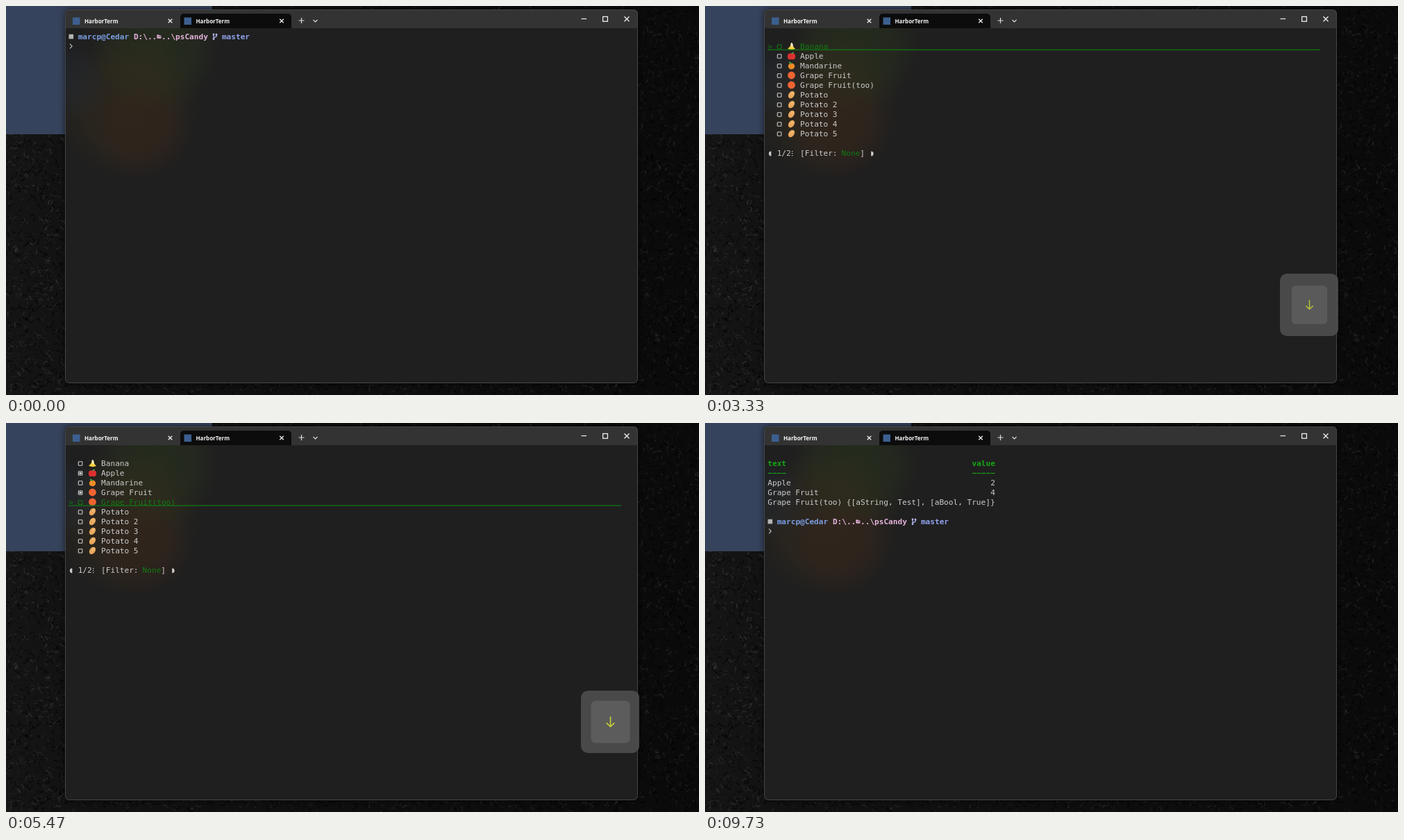
Animation of 998x561 px, one loop 9790 ms. Source, as an HTML page with a canvas:

```html
<!DOCTYPE html>
<html lang="en">
<head>
<meta charset="utf-8">
<title>Terminal list picker</title>
<style>
html, body { margin: 0; width: 100%; height: 100%; overflow: hidden; background: #0a0a0a; }
canvas { display: block; width: 998px; height: 561px; }
</style>
</head>
<body>
<canvas id="stage" width="998" height="561"></canvas>
<script>
const W = 998, H = 561, LOOP = 9790;
const MONO = '"DejaVu Sans Mono", monospace';
const CELL = 6.686, LEFT = 90.3, ROW = 14;
const WHITE = '#cccccc', GREEN = '#16a816', PICK = '#117a12';
const ITEMS = ['Banana', 'Apple', 'Mandarine', 'Grape Fruit', 'Grape Fruit(too)',
  'Potato', 'Potato 2', 'Potato 3', 'Potato 4', 'Potato 5'];
const PRESSES = [[1200, 'up'], [2330, 'enter'], [3330, 'down'], [3600, 'tab'],
  [3870, 'down'], [4070, 'down'], [4330, 'down'], [4530, 'up'], [4730, 'tab'],
  [5400, 'down'], [5930, 'tab'], [6730, 'enter']];
const RECALL = 1330, LIST = 2530, RESULT = 6870, HIDE = 7800, LAG = 70;

const ctx = document.getElementById('stage').getContext('2d');
const backdrop = document.createElement('canvas');
backdrop.width = W;
backdrop.height = H;

const colX = c => LEFT + c * CELL;
const rowY = r => 44 + r * ROW;

function box(g, x, y, w, h, r, fill) {
  g.beginPath();
  g.roundRect(x, y, w, h, r);
  g.fillStyle = fill;
  g.fill();
}

function line(g, color, width, ...paths) {
  g.strokeStyle = color;
  g.lineWidth = width;
  g.beginPath();
  for (const p of paths)
    for (let i = 0; i < p.length; i += 2)
      i ? g.lineTo(p[i], p[i + 1]) : g.moveTo(p[i], p[i + 1]);
  g.stroke();
}

function oval(x, y, rx, ry, turn, fill) {
  ctx.beginPath();
  ctx.ellipse(x, y, rx, ry, turn, 0, 7);
  ctx.fillStyle = fill;
  ctx.fill();
}

function write(str, col, row, color = WHITE, weight = '') {
  ctx.font = `${weight} 11.1px ${MONO}`;
  ctx.fillStyle = color;
  ctx.fillText(str, colX(col), rowY(row) + 4);
}

function randomizer(seed) {
  return () => (seed = (seed * 16807) % 2147483647) / 2147483647;
}

function drawLeather(g) {
  const rnd = randomizer(77);
  const base = g.createLinearGradient(0, 0, W, 0);
  base.addColorStop(0, '#151515');
  base.addColorStop(0.12, '#111111');
  base.addColorStop(0.9, '#0b0b0b');
  base.addColorStop(1, '#0a0a0a');
  g.fillStyle = base;
  g.fillRect(0, 0, W, H);
  g.lineCap = 'round';
  for (let i = 0; i < 16000; i++) {
    const x = rnd() * W, y = rnd() * H, a = rnd() * 6.3, len = 1 + rnd() * 2.5;
    const light = rnd() < 0.5;
    const alpha = rnd() * (x < 100 ? 0.1 : 0.075);
    const width = 0.8 + rnd() * 1.2;
    if (x > 95 && x < 900 && y > 12 && y < 535) continue;
    g.strokeStyle = light ? `rgba(255,255,255,${alpha})` : 'rgba(0,0,0,.45)';
    g.lineWidth = width;
    g.beginPath();
    g.moveTo(x, y);
    g.quadraticCurveTo(x + Math.cos(a) * len, y + Math.sin(a) * len,
      x + Math.cos(a + 0.6) * len * 2, y + Math.sin(a + 0.6) * len * 2);
    g.stroke();
  }
  g.lineCap = 'butt';
}

function glow(g, x, y, r, rgb, alpha) {
  const grad = g.createRadialGradient(x, y, 0, x, y, r);
  grad.addColorStop(0, `rgba(${rgb},${alpha})`);
  grad.addColorStop(0.6, `rgba(${rgb},${alpha * 0.7})`);
  grad.addColorStop(1, `rgba(${rgb},0)`);
  g.fillStyle = grad;
  g.fillRect(85, 32, 825, 512);
}

function cross(g, x, y, r, color, width) {
  line(g, color, width, [x - r, y - r, x + r, y + r], [x - r, y + r, x + r, y - r]);
}

function tab(g, x) {
  box(g, x + 11, 16.5, 10.5, 10.5, 0, '#3c5f8f');
  g.font = '700 8px "Open Sans", "Noto Sans", sans-serif';
  g.fillStyle = '#f4f4f4';
  g.fillText('HarborTerm', x + 28, 25);
  cross(g, x + 151.5, 21.5, 2.8, '#eeeeee', 1.3);
}

function drawBackdrop(g) {
  drawLeather(g);
  g.fillStyle = '#36435c';
  g.fillRect(0, -112, 297, 297);

  g.save();
  g.shadowColor = 'rgba(0,0,0,.6)';
  g.shadowBlur = 10;
  box(g, 85, 5, 825, 539, 6, '#1f1f1f');
  g.restore();
  g.save();
  g.beginPath();
  g.roundRect(85, 5, 825, 539, 6);
  g.clip();
  glow(g, 215, 60, 95, '44,56,28', 0.5);
  glow(g, 175, 145, 105, '58,46,28', 0.5);
  glow(g, 195, 180, 72, '60,34,24', 0.3);
  glow(g, 92, 110, 55, '36,44,56', 0.4);
  g.fillStyle = '#333333';
  g.fillRect(85, 5, 825, 27);
  box(g, 251, 11, 160, 21, [5, 5, 0, 0], '#0c0c0c');
  g.restore();
  g.beginPath();
  g.roundRect(85.5, 5.5, 824, 538, 6);
  g.strokeStyle = '#454545';
  g.lineWidth = 1;
  g.stroke();

  tab(g, 85);
  tab(g, 245.5);
  line(g, '#dddddd', 1.2, [421.5, 21, 429.5, 21], [425.5, 17, 425.5, 25]);
  line(g, '#dddddd', 1.2, [442.5, 20, 445.5, 23, 448.5, 20]);
  line(g, '#eeeeee', 1.2, [828.5, 18.5, 836, 18.5]);
  g.lineWidth = 1.3;
  g.strokeRect(859.6, 15.4, 6.8, 6.8);
  cross(g, 894, 18.7, 3.5, '#eeeeee', 1.3);
}

function caret(col, row) {
  ctx.fillStyle = '#e6e6e6';
  ctx.fillRect(colX(col) + 0.3, rowY(row) - 6.5, 1.2, 13.5);
}

function prompt(row) {
  const y = rowY(row);
  box(ctx, 90.5, y - 3.2, 6.6, 6.6, 0, '#b4b4b4');
  write('marcp@Cedar', 2, row, '#7d9fe4', 'bold');
  write('D:\\..', 14, row, '#e6b2dc', 'bold');
  write('..\\psCandy', 20, row, '#e6b2dc', 'bold');
  write('master', 33, row, '#90a4ee', 'bold');
  box(ctx, 217.5, y - 2.5, 3, 2, 0, '#e6b2dc');
  box(ctx, 217.5, y - 1.5, 6, 4.2, 0.5, '#e6b2dc');
  line(ctx, '#1f1f1f', 0.7, [219, y + 0.2, 224, y + 0.2]);

  const ink = '#b4b4f0';
  line(ctx, ink, 1.3, [299, y - 3, 299, y + 4], [303, y - 2.5, 303, y, 299, y + 2]);
  oval(299, y - 3, 1.4, 1.4, 0, ink);
  oval(303, y - 2.8, 1.4, 1.4, 0, ink);
  oval(299, y + 3.7, 1.4, 1.4, 0, ink);
  line(ctx, '#b8b8b8', 1.2, [92, y + 10.7, 95.2, y + 14, 92, y + 17.3]);
}

function fruit(i, y) {
  const x = 124.5;
  if (i === 0) {
    ctx.beginPath();
    ctx.moveTo(x - 0.5, y - 5);
    ctx.quadraticCurveTo(x + 1.5, y, x + 5.5, y + 4);
    ctx.quadraticCurveTo(x, y + 6.5, x - 5.5, y + 3.5);
    ctx.quadraticCurveTo(x - 1, y + 1, x - 0.5, y - 5);
    ctx.fillStyle = '#f2cf3d';
    ctx.fill();
    oval(x + 0.7, y - 1.8, 1.5, 3.3, -0.15, '#f5ecc4');
  } else if (i === 1) {
    oval(x - 2, y + 0.8, 3.6, 4.5, 0, '#dc3030');
    oval(x + 2, y + 0.8, 3.6, 4.5, 0, '#dc3030');
    oval(x + 1.6, y - 4.2, 2, 1, -0.5, '#4c9c3c');
  } else if (i === 2) {
    oval(x, y + 0.8, 4.7, 4.4, 0, '#f08c28');
    oval(x - 1.6, y - 3.8, 2.4, 1.2, 0.5, '#4c9c3c');
  } else if (i < 5) {
    oval(x, y, 5.4, 5.4, 0, '#f06432');
  } else {
    oval(x, y, 4, 5.8, 0.6, '#e8a65c');
    oval(x + 1, y - 1.5, 1.8, 2.6, 0.6, '#f0b670');
  }
}

function picker(sel, checked) {
  ITEMS.forEach((name, i) => {
    const row = i + 1, y = rowY(row), ink = i === sel ? PICK : WHITE;
    ctx.beginPath();
    ctx.roundRect(104.3, y - 2.3, 5.6, 5.6, 0.8);
    ctx.strokeStyle = ink;
    ctx.lineWidth = 1.1;
    ctx.stroke();
    if (checked.has(i)) box(ctx, 105.5, y - 1.1, 3.2, 3.2, 0, ink);
    fruit(i, y);
    write(name, 7, row, ink);
    if (i === sel) {
      write('>', 0, row, ink);
      line(ctx, PICK, 1.3, [90, y + 5.2, 886, y + 5.2]);
    }
  });

  const y = rowY(12);
  ctx.fillStyle = WHITE;
  ctx.beginPath();
  ctx.arc(95.3, y + 1, 3.4, Math.PI / 2, Math.PI * 1.5);
  ctx.fill();
  ctx.beginPath();
  ctx.arc(239.2, y + 1, 3.4, -Math.PI / 2, Math.PI / 2);
  ctx.fill();
  write('1/2', 2, 12);
  for (const d of [-3, 0, 3]) box(ctx, 125, y + d, 1.3, 1.3, 0, WHITE);
  write('[Filter:', 7, 12);
  write('None', 15.9, 12, PICK);
  write(']', 19.9, 12);
}

// Table rule: dashes that almost touch.
function rule(col, cells) {
  const y = rowY(2) + 0.5;
  for (let c = col; c < col + cells; c++)
    line(ctx, GREEN, 1.1, [colX(c) + 0.4, y, colX(c + 1) - 0.4, y]);
}

function results() {
  write('text', 0, 1, GREEN, 'bold');
  write('value', 44, 1, GREEN, 'bold');
  rule(0, 4);
  rule(44, 5);
  write('Apple', 0, 3);
  write('2', 48, 3);
  write('Grape Fruit', 0, 4);
  write('4', 48, 4);
  write('Grape Fruit(too) {[aString, Test], [aBool, True]}', 0, 5);
  prompt(7);
}

function arrow(dir) {
  ctx.lineCap = ctx.lineJoin = 'round';
  line(ctx, '#d8e62e', 1.6, [0, -7.5, 0, 7.5], [-5.7, 2 * dir, 0, 7.5 * dir, 5.7, 2 * dir]);
  ctx.lineCap = 'butt';
  ctx.lineJoin = 'miter';
}

function wideFace(label) {
  ctx.font = '600 14.5px Inter, sans-serif';
  ctx.fillStyle = '#ffffff';
  ctx.textAlign = 'right';
  ctx.fillText(label, 38.7, 21);
  ctx.textAlign = 'left';
  if (label === 'tab') {
    line(ctx, '#ffffff', 1.2, [28.5, -17, 28.5, -22, 38, -22], [35.5, -24.5, 38, -22, 35.5, -19.5],
      [37.5, -20, 37.5, -15, 28, -15], [30.5, -17.5, 28, -15, 30.5, -12.5]);
  } else {
    line(ctx, '#ffffff', 1.2, [38, -23, 38, -17, 28, -17], [31, -20, 28, -17, 31, -14]);
  }
}

function keycap(key, age) {
  const wide = key === 'tab' || key === 'enter';
  const left = wide ? 792 : 828, w = wide ? 97 : 61;
  box(ctx, left, 386, 912 - left, 90, 10, 'rgba(84,84,84,.8)');
  const rest = Math.max(0, 1 - age / 230) ** 2;
  const scale = 1 - 0.16 * rest;
  ctx.save();
  ctx.translate(left + 12 + w / 2, 431);
  ctx.scale(scale, scale);
  ctx.globalAlpha = 1 - 0.2 * rest;
  box(ctx, -w / 2, -33, w, 66, 7, wide ? '#2196f3' : '#5e5e5e');
  if (wide) wideFace(key);
  else arrow(key === 'up' ? -1 : 1);
  ctx.restore();
}

// Blink half-period is about 533 ms, restarted by each new prompt.
const blink = (t, start) => Math.floor((t - start) / 533) % 2 === 0;

function draw(t) {
  ctx.drawImage(backdrop, 0, 0);
  if (t < LIST) {
    prompt(0);
    if (t >= RECALL) {
      write('.\\ShowVegetables.ps1', 2, 1, '#ece8a4');
      caret(22, 1);
    } else if (t >= 1200 || (t >= 470 && t < 1000)) {
      caret(2, 1);
    }
  } else if (t < RESULT) {
    let sel = 0;
    const checked = new Set();
    for (const [at, key] of PRESSES) {
      if (at < LIST || at + LAG > t) continue;
      if (key === 'down') sel++;
      if (key === 'up') sel--;
      if (key === 'tab') checked.add(sel);
    }
    picker(sel, checked);
  } else {
    results();
    if (blink(t, RESULT)) caret(2, 8);
  }
  if (t < HIDE) {
    const last = PRESSES.filter(p => p[0] <= t).pop();
    if (last) keycap(last[1], t - last[0]);
  }
}

drawBackdrop(backdrop.getContext('2d'));
const start = performance.now();
function tick() {
  draw((performance.now() - start) % LOOP);
  requestAnimationFrame(tick);
}
tick();
</script>
</body>
</html>
```
